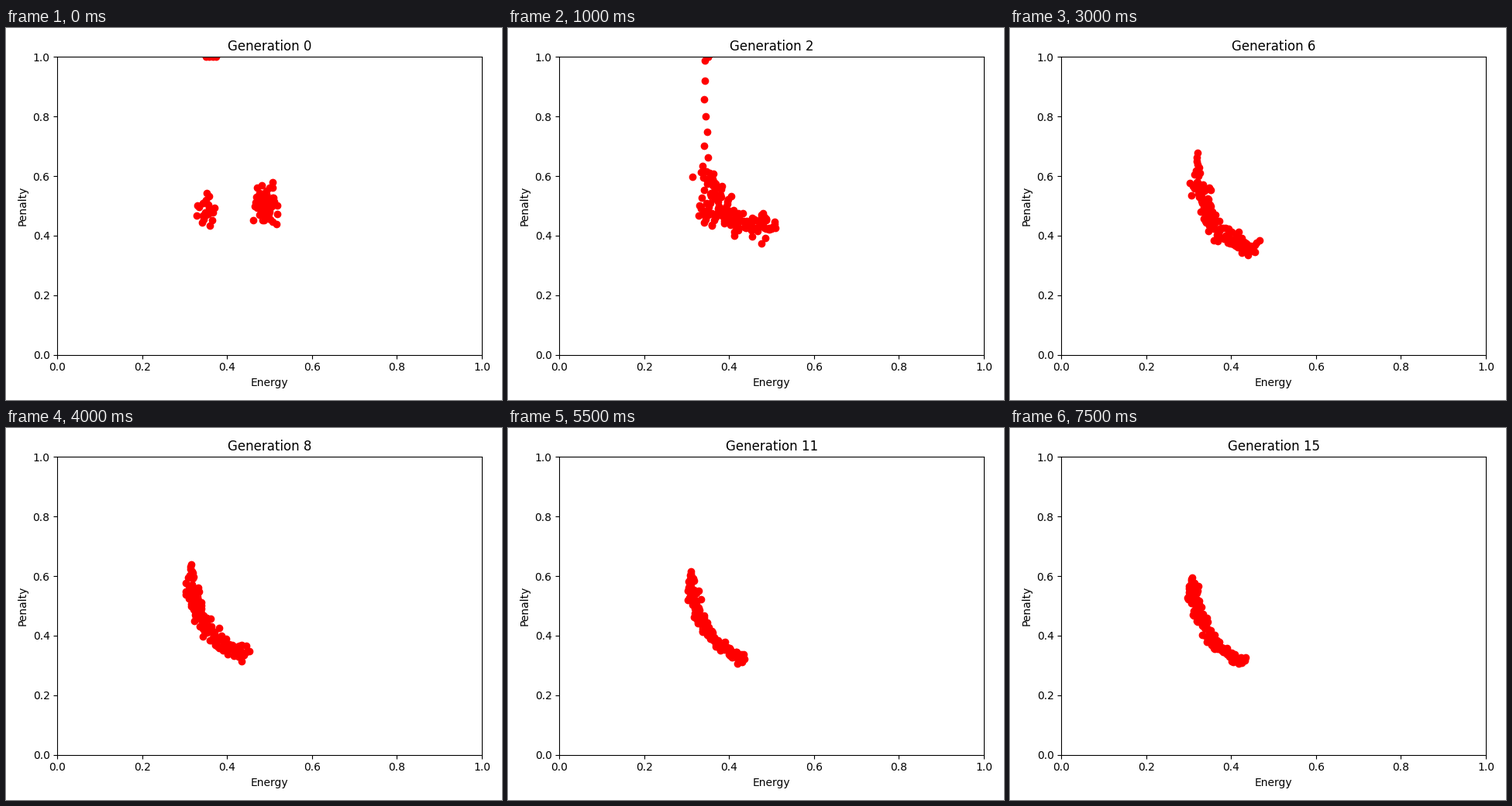
Animation, 640 px wide and 480 px high, one loop 8000 ms. Source, as a matplotlib script:

```python
import numpy as np
import matplotlib.pyplot as plt
from matplotlib.animation import FuncAnimation

GENS, STEP = 16, 500
N, LIFE = 110, 3

# Bezier control points (energy, penalty) of the front: top, corner, right end
EARLY = np.array([(.353, .615), (.360, .425), (.513, .432)])
LATE = np.array([(.306, .565), (.325, .366), (.426, .306)])

rng = np.random.default_rng(11)


def cluster(n, center, sd):
    """Normal cloud, fittest individuals first."""
    pts = center + np.clip(rng.normal(size=(n, 2)), -2.3, 2.3) * sd
    return pts[np.argsort(pts.sum(axis=1))]


LEFT = cluster(24, (.351, .496), (.012, .034))
RIGHT = cluster(76, (.490, .500), (.013, .034))
ALONG = rng.uniform(-.5, .5, (GENS, N)) / N
ACROSS = np.clip(rng.normal(size=(GENS, N)), -2, 2)
TAIL = rng.uniform(-.010, .010, 9)


def progress(g):
    return 1 - np.exp(-np.maximum(g - 1, 0) / 4)


def front(g):
    """Individuals keep the place they were born at for LIFE generations."""
    i = np.arange(N)
    born = np.maximum(g - (g + i) % LIFE, 1)
    s = progress(born)[:, None]
    top, corner, end = [a + (b - a) * s for a, b in zip(EARLY, LATE)]

    u = np.clip(i / (N - 1) + ALONG[born, i], 0, 1)[:, None]
    pos = (1 - u) ** 2 * top + 2 * u * (1 - u) * corner + u ** 2 * end
    tangent = (1 - u) * (corner - top) + u * (end - corner)
    normal = tangent[:, ::-1] * (-1, 1)
    normal /= np.linalg.norm(normal, axis=1, keepdims=True)
    return pos + normal * (.007 + .012 * (1 - s)) * ACROSS[born, i][:, None]


def tail(g):
    """Sparse high-penalty column that sinks onto the top of the front."""
    energy = EARLY[0, 0] + (LATE[0, 0] - EARLY[0, 0]) * progress(g) + TAIL
    height = .03 + .34 * np.exp(-(g - 2) / 2)
    rise = np.linspace(0, 1, len(TAIL)) ** 1.5
    return np.column_stack([energy, np.minimum(.625 - .004 * g + height * rise, 1)])


def population(g):
    parts = [LEFT[:int(len(LEFT) * .7 ** g)], RIGHT[:int(len(RIGHT) * .35 ** g)]]
    if g <= 2:
        # worst individuals sit on the penalty limit
        parts.append(np.column_stack([np.linspace(.350, .374 - .012 * g, 4), np.ones(4)]))
    if g >= 1:
        parts += [front(g), tail(g)]
    return np.vstack(parts)


fig, ax = plt.subplots(figsize=(6.4, 4.8), dpi=100)
ax.set(xlim=(0, 1), ylim=(0, 1), xlabel="Energy", ylabel="Penalty")
title = ax.set_title("Generation 0")
dots, = ax.plot([], [], "ro")
fig.tight_layout()


def update(g):
    dots.set_data(*population(g).T)
    title.set_text(f"Generation {g}")
    return dots, title


anim = FuncAnimation(fig, update, frames=GENS, interval=STEP, repeat=True, repeat_delay=0)
plt.show()
```
